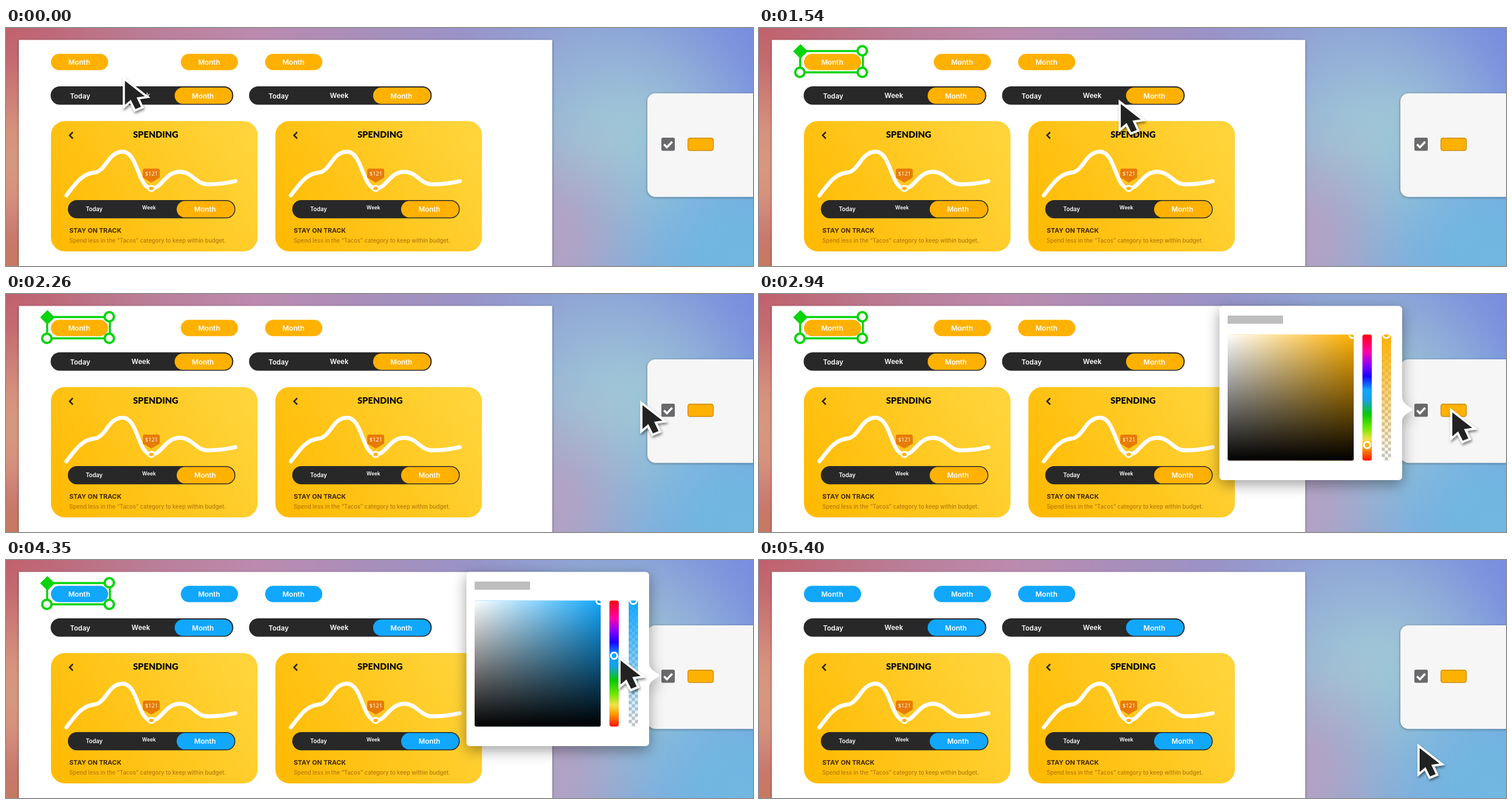
An HTML page that plays this animation: 1280 px wide and 408 px high, repeating every 7070 ms.

```html
<!DOCTYPE html>
<html lang="en">
<head>
<meta charset="utf-8">
<title>Shared colour swatch</title>
<style>
  html, body { margin: 0; width: 100%; height: 100%; overflow: hidden; }
  svg { display: block; width: 100%; height: 100%; }
  text { font-family: Inter, "Open Sans", sans-serif; font-weight: 600; text-anchor: middle; fill: #fff; }
  .title { font-family: Lato, sans-serif; font-weight: 900; font-size: 15.2px; fill: #0c0a04; }
  .tip { font-family: "Open Sans", sans-serif; font-weight: 400; font-size: 9.7px; }
  .head { font-weight: 700; font-size: 11px; fill: #43280a; text-anchor: start; }
  .note { font-weight: 500; font-size: 9.7px; fill: #b5790a; text-anchor: start; }
  .accent { fill: var(--accent); }
  .ring { stroke: #fff; stroke-width: 3; }
</style>
</head>
<body>
<svg id="stage" viewBox="0 0 1280 408" preserveAspectRatio="none">
  <defs>
    <linearGradient id="sky">
      <stop offset="0" stop-color="#c0606c"/>
      <stop offset=".18" stop-color="#ba7c94"/>
      <stop offset=".33" stop-color="#bc8aae"/>
      <stop offset=".5" stop-color="#a68fbc"/>
      <stop offset=".76" stop-color="#8998d6"/>
      <stop offset="1" stop-color="#7488e0"/>
    </linearGradient>
    <linearGradient id="card" x1="0" y1=".7" x2="1" y2=".3">
      <stop offset="0" stop-color="#ffbb04"/>
      <stop offset="1" stop-color="#ffd43a"/>
    </linearGradient>
    <linearGradient id="white">
      <stop offset="0" stop-color="#fff"/>
      <stop offset="1" stop-color="#fff" stop-opacity="0"/>
    </linearGradient>
    <linearGradient id="black" x2="0" y2="1">
      <stop offset="0" stop-opacity="0"/>
      <stop offset="1"/>
    </linearGradient>
    <linearGradient id="hue" x2="0" y2="1">
      <stop offset="0" stop-color="#ff0010"/>
      <stop offset=".14" stop-color="#ff00a8"/>
      <stop offset=".24" stop-color="#8a00ff"/>
      <stop offset=".33" stop-color="#1800ff"/>
      <stop offset=".44" stop-color="#12a5ff"/>
      <stop offset=".52" stop-color="#18a0e8"/>
      <stop offset=".63" stop-color="#08c808"/>
      <stop offset=".74" stop-color="#6ce800"/>
      <stop offset=".83" stop-color="#f4e048"/>
      <stop offset=".9" stop-color="#ff9c00"/>
      <stop offset="1" stop-color="#ff1000"/>
    </linearGradient>
    <linearGradient id="alpha" x2="0" y2="1">
      <stop offset="0" style="stop-color:var(--accent)"/>
      <stop offset="1" style="stop-color:var(--accent)" stop-opacity="0"/>
    </linearGradient>
    <pattern id="checker" x="1067" y="69" width="10.8" height="10.8" patternUnits="userSpaceOnUse">
      <path d="M0 0h10.8v10.8h-10.8z" fill="#fff"/>
      <path d="M0 0h5.4v10.8h5.4v-5.4h-10.8z" fill="#c4c4c4"/>
    </pattern>
    <clipPath id="squareClip"><rect x="803" y="69.5" width="216" height="216" rx="3"/></clipPath>
    <clipPath id="alphaClip"><rect x="1067" y="69.5" width="16" height="216" rx="4"/></clipPath>
    <filter id="softShadow" x="-20%" y="-20%" width="140%" height="150%">
      <feDropShadow dx="0" dy="7" stdDeviation="12" flood-opacity=".38"/>
    </filter>
    <filter id="edgeShadow" x="-5%" y="-5%" width="110%" height="112%">
      <feDropShadow dx="0" dy="1" stdDeviation="2" flood-opacity=".4"/>
    </filter>
    <filter id="cursorShadow" x="-40%" y="-40%" width="190%" height="190%">
      <feDropShadow dx="1.5" dy="3" stdDeviation="2" flood-opacity=".5"/>
    </filter>
  </defs>
  <g id="scene"></g>
  <g id="selection" fill="none" stroke="#08d40c" stroke-width="3.6">
    <rect x="70.5" y="39.5" width="107.5" height="36.5"/>
    <g fill="#f7f7f7" stroke-width="4">
      <circle cx="177" cy="39" r="8"/>
      <circle cx="177" cy="76" r="8"/>
      <circle cx="70" cy="76" r="8"/>
    </g>
    <path d="M71 27.5l12.5 12.5l-12.5 12.5l-12.5-12.5z" fill="#08d40c" stroke="none"/>
  </g>
  <g id="popup">
    <path filter="url(#softShadow)" fill="#fff" d="M795 20.5H1096a6 6 0 0 1 6 6V178C1103 189 1114 192 1120 198C1114 204 1103 206 1102 217V313a6 6 0 0 1-6 6H795a6 6 0 0 1-6-6V26.5a6 6 0 0 1 6-6z"/>
    <rect x="803" y="37" width="95" height="14" fill="#bebebe"/>
    <g clip-path="url(#squareClip)">
      <rect class="accent" x="803" y="69" width="216" height="217"/>
      <rect x="803" y="69" width="216" height="217" fill="url(#white)"/>
      <rect x="803" y="69" width="216" height="217" fill="url(#black)"/>
      <circle class="ring" cx="1017" cy="70" r="5.5" fill="none"/>
    </g>
    <rect x="1034" y="69.5" width="16" height="216" rx="4" fill="url(#hue)"/>
    <g clip-path="url(#alphaClip)">
      <rect x="1067" y="69" width="16" height="217" fill="url(#checker)"/>
      <rect x="1067" y="69" width="16" height="217" fill="url(#alpha)"/>
      <circle class="ring" cx="1075" cy="70" r="5.5" fill="none"/>
    </g>
    <circle id="hueKnob" class="ring accent" cx="1042" r="5.5"/>
  </g>
  <g id="cursor" filter="url(#cursorShadow)">
    <path d="M4 7V48L14 39.5L22 55.5L31.5 51.5L24 35.5L38 33.5z" fill="#222" stroke="#fff"
      stroke-width="7.5" stroke-miterlimit="8" paint-order="stroke"/>
  </g>
</svg>
<script>
const LOOP = 7070;
const ORANGE = [255, 177, 0], BLUE = [17, 167, 253];
const byId = id => document.getElementById(id);

const label = (x, y, size, str) => `<text x="${x}" y="${y}" font-size="${size}">${str}</text>`;
const pill = (x, y, w, h, attrs) =>
  `<rect x="${x}" y="${y}" width="${w}" height="${h}" rx="${h / 2}" ${attrs}/>`;
const glow = (id, cx, cy, r, color) =>
  `<radialGradient id="${id}" gradientUnits="userSpaceOnUse" cx="${cx}" cy="${cy}" r="${r}">
     <stop offset="0" stop-color="${color}"/>
     <stop offset=".25" stop-color="${color}" stop-opacity=".88"/>
     <stop offset=".75" stop-color="${color}" stop-opacity=".18"/>
     <stop offset="1" stop-color="${color}" stop-opacity="0"/>
   </radialGradient><rect width="1280" height="408" fill="url(#${id})"/>`;

const button = x => pill(x, 44.3, 98, 28, 'class="accent"') + label(x + 48.5, 63, 12.1, 'Month');

const tabs = dx => `<g transform="translate(${dx})">
  ${pill(76.5, 100, 313, 31.5, 'fill="#282828"')}
  ${pill(289, 102, 98.5, 28, 'class="accent"')}
  ${label(127, 120.5, 11.7, 'Today')}${label(231, 119.7, 11.7, 'Week')}${label(337.5, 120.8, 12, 'Month')}
</g>`;

const card = dx => `<g transform="translate(${dx})">
  <rect x="77" y="159.5" width="354" height="223.5" rx="24" fill="url(#card)"/>
  <path d="M114.5 178.5l-5.5 5.5l5.5 5.5" fill="none" stroke="#2a2614" stroke-width="2.6"/>
  <text class="title" x="256.5" y="187.5">SPENDING</text>
  <path d="M103.5 287C120 265 131 250 150 248C172 246.500 174 212 200 212C226 212 226 275 249 275
    C268 275 272 246.500 298 246.500C320 246.500 325 268 346 268C365 268 380 265.500 393 262.500"
    fill="none" stroke="#fff" stroke-width="6.8" stroke-linecap="round"/>
  <ellipse cx="249" cy="275" rx="5.5" ry="4.5" fill="#ffb41c" stroke="#fff" stroke-width="3"/>
  <path d="M237.5 241h23a3 3 0 0 1 3 3v12.5L249 265L234.5 256.5V244a3 3 0 0 1 3-3z" fill="#e87b04"/>
  <text class="tip" x="249.3" y="252.5">$121</text>
  ${pill(106, 295, 287, 31.3, 'fill="#282828"')}
  ${pill(292.5, 296.5, 99, 28.3, 'class="accent"')}
  ${label(151, 313.5, 9.7, 'Today')}${label(245, 311.3, 8.6, 'Week')}${label(341, 315.3, 11.9, 'Month')}
  <text class="head" x="108.5" y="350.5">STAY ON TRACK</text>
  <text class="note" x="108.5" y="368">Spend less in the “Tacos” category to keep within budget.</text>
</g>`;

byId('scene').innerHTML = `
  <rect width="1280" height="408" fill="url(#sky)"/>
  ${glow('warm', 0, 230, 230, '#d8987f')}
  ${glow('clay', 10, 420, 110, '#c67a62')}
  ${glow('mist', 1060, 215, 340, '#a0c8d6')}
  ${glow('lavender', 930, 370, 240, '#b2a2c4')}
  ${glow('aqua', 1260, 400, 310, '#70b8e2')}
  <rect x="22" y="20.5" width="914" height="400" fill="#fff" filter="url(#edgeShadow)"/>
  ${[77, 299.5, 444].map(button).join('')}
  ${[0, 340].map(tabs).join('')}
  ${[0, 384.5].map(card).join('')}
  <rect x="1099" y="112" width="220" height="177.5" rx="14" fill="#f6f6f6" filter="url(#edgeShadow)"/>
  <rect x="1123" y="188" width="23" height="22.5" rx="2.5" fill="#6a6a6d"/>
  <path d="M1127.5 199.5l5 5l9-9.5" fill="none" stroke="#fff" stroke-width="3.6"/>
  <rect x="1168.5" y="188.7" width="43.5" height="21.3" rx="3.5" fill="#ffb100" stroke="#cf8d0c" stroke-width="1.4"/>`;

// Cursor tip: [time, x, y], straight moves at constant speed
const route = [
  [0, 200, 83.5], [320, 123, 60], [787, 123, 60], [2410, 1184, 196], [3100, 1184, 196],
  [3523, 1047.4, 162], [4335, 1047.4, 162], [5070, 1128, 315.5], [LOOP, 1128, 315.5]
];

const mix = (a, b, k) => a + (b - a) * k;
const ramp = (t, from, to) => Math.min(1, Math.max(0, (t - from) / (to - from)));

function cursorAt(t) {
  const i = Math.max(1, route.findIndex(p => p[0] > t));
  const [t0, x0, y0] = route[i - 1], [t1, x1, y1] = route[i];
  const k = ramp(t, t0, t1);
  return [mix(x0, x1, k), mix(y0, y1, k)];
}

function draw(t) {
  const closing = 1 - ramp(t, 5220, 5400);
  const shift = ramp(t, 3650, 3750);
  const accent = ORANGE.map((c, i) => Math.round(mix(c, BLUE[i], shift)));
  byId('stage').style.setProperty('--accent', `rgb(${accent})`);
  byId('hueKnob').setAttribute('cy', mix(259, 164, shift));
  byId('selection').setAttribute('opacity', ramp(t, 540, 720) * closing);
  byId('popup').setAttribute('opacity', ramp(t, 2690, 2870) * closing);
  byId('cursor').setAttribute('transform', `translate(${cursorAt(t)})`);
}

const start = performance.now();
function tick() {
  draw((performance.now() - start) % LOOP);
  requestAnimationFrame(tick);
}
tick();
</script>
</body>
</html>
```
